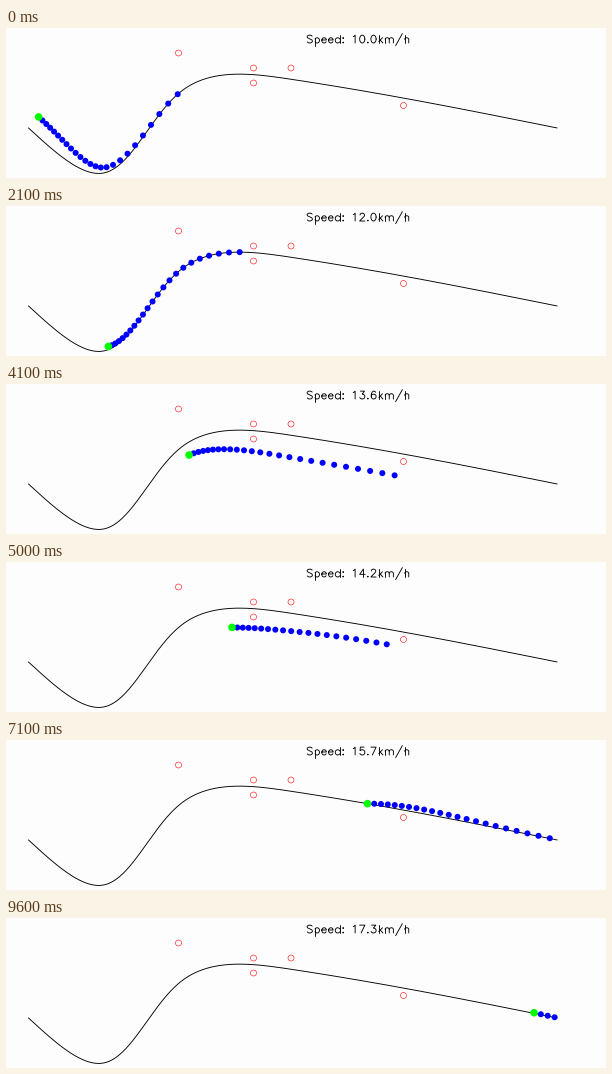
A matplotlib script for the animation above (9700 ms loop, 600 px wide and 150 px high).

```python
import numpy as np
import matplotlib.pyplot as plt
from matplotlib.animation import FuncAnimation
from matplotlib.collections import LineCollection
from matplotlib.patches import Circle

W, H, DPI = 600, 150, 100
FRAMES, INTERVAL = 97, 100
SCALE = 7.5                      # pixels per metre
PX = 72 / DPI                    # points per pixel

# Planner settings (SI units)
DT = 0.2
HORIZONS = np.arange(20, 26) * DT
OFFSETS = np.arange(-7, 3)       # the road is wider on the right
TARGET = 30 / 3.6
END_SPEEDS = (25 / 3.6, TARGET)
MAX_SPEED, MAX_ACCEL, MAX_CURVATURE = 50 / 3.6, 2.0, 1.0
RADIUS = 1.5
K_JERK, K_TIME, K_SPEED, K_OFFSET = 0.1, 0.1, 0.6, 1.0

way_x = np.array([0, 10, 20.5, 35, 70.5])
way_y = np.array([0, -6, 5, 6.5, 0])
obstacles = np.array([(20, 10), (30, 6), (30, 8), (35, 8), (50, 3)])

Poly = np.polynomial.Polynomial


def natural_spline(knots, vals):
    """Return a function giving value and slope of a natural cubic spline."""
    n = len(knots)
    h = np.diff(knots)
    slope = np.diff(vals) / h
    A, B = np.eye(n), np.zeros(n)
    for i in range(1, n - 1):
        A[i, i - 1:i + 2] = h[i - 1], 2 * (h[i - 1] + h[i]), h[i]
        B[i] = 3 * (slope[i] - slope[i - 1])
    c = np.linalg.solve(A, B)
    b = slope - h * (c[1:] + 2 * c[:-1]) / 3
    d = np.diff(c) / (3 * h)

    def at(s):
        i = np.clip(np.searchsorted(knots, s, side="right") - 1, 0, n - 2)
        u = s - knots[i]
        value = vals[i] + u * (b[i] + u * (c[i] + u * d[i]))
        return value, b[i] + u * (2 * c[i] + 3 * u * d[i])

    return at


knots = np.concatenate([[0], np.cumsum(np.hypot(np.diff(way_x), np.diff(way_y)))])
spline_x = natural_spline(knots, way_x)
spline_y = natural_spline(knots, way_y)


def to_world(s, d):
    """Map distance along the course and side offset to x, y."""
    keep = s < knots[-1]
    s, d = s[keep], d[keep]
    x, dx = spline_x(s)
    y, dy = spline_y(s)
    norm = np.hypot(dx, dy)
    return x - d * dy / norm, y + d * dx / norm


def to_pixels(x, y):
    return 22.5 + SCALE * x, 100 - SCALE * y


def side_poly(d, v, a, end, T):
    """Quintic that comes to rest at the offset `end`."""
    gap = end - (d + v * T + a * T**2 / 2)
    dv, da = -(v + a * T) * T, -a * T**2
    return Poly([d, v, a / 2,
                 (10 * gap - 4 * dv + da / 2) / T**3,
                 (-15 * gap + 7 * dv - da) / T**4,
                 (6 * gap - 3 * dv + da / 2) / T**5])


def along_poly(s, v, end, T):
    """Quartic that reaches the speed `end` without acceleration."""
    return Poly([s, v, 0, (end - v) / T**2, -(end - v) / (2 * T**3)])


def is_safe(t, along, x, y):
    if along.deriv()(t).max() >= MAX_SPEED or along.deriv(2)(t).max() >= MAX_ACCEL:
        return False
    dx, dy = np.diff(x), np.diff(y)
    bend = np.diff(np.arctan2(dy, dx)) / np.hypot(dx, dy)[:-1]
    if bend.max(initial=0) >= MAX_CURVATURE:
        return False
    gaps = np.hypot(x[:, None] - obstacles[:, 0], y[:, None] - obstacles[:, 1])
    return gaps.min(initial=np.inf) > RADIUS


def plan(s, v, d, d_v, d_a):
    """Return the cheapest safe pair of polynomials and its points."""
    options = []
    for T in HORIZONS:
        t = DT * np.arange(round(T / DT))
        runs = []
        for end in END_SPEEDS:
            along = along_poly(s, v, end, T)
            jerk = np.sum(along.deriv(3)(t)**2)
            miss = (TARGET - along.deriv()(t[-1]))**2
            runs.append((K_JERK * jerk + K_TIME * T + K_SPEED * miss, along))
        for end in OFFSETS:
            side = side_poly(d, d_v, d_a, end, T)
            jerk = np.sum(side.deriv(3)(t)**2)
            cost = K_JERK * jerk + K_TIME * T + K_OFFSET * side(t[-1])**2
            options += [(cost + run_cost, t, along, side) for run_cost, along in runs]
    options.sort(key=lambda option: option[0])
    best = None
    for _, t, along, side in options:
        x, y = to_world(along(t), side(t))
        best = best or (along, side, x, y)
        if is_safe(t, along, x, y):
            return along, side, x, y
    return best


def drive():
    """Replan at every step; collect path pixels and the speed label."""
    s, v, d, d_v, d_a = 0.0, 10 / 3.6, 2.0, 0.0, 0.0
    steps = []
    for _ in range(FRAMES):
        along, side, x, y = plan(s, v, d, d_v, d_a)
        s, v = along(DT), along.deriv()(DT)
        d, d_v, d_a = side(DT), side.deriv()(DT), side.deriv(2)(DT)
        label = f"Speed: {v * 3.6:.6f}"[:11] + "km/h"
        steps.append((np.column_stack(to_pixels(x, y)), label))
    return steps


# Single-stroke lettering: 21 units tall, baseline at 0
def arc(cx, cy, rx, ry, start, stop):
    a = np.radians(np.linspace(start, stop, 17))
    return list(zip(cx + rx * np.cos(a), cy + ry * np.sin(a)))


def dot(y):
    return [(5, y + 2), (4, y + 1), (5, y), (6, y + 1), (5, y + 2)]


def stem(x, top, bottom=0):
    return [(x, top), (x, bottom)]


def arch(x):
    return arc(x + 5.5, 9.5, 5.5, 4.5, 175, 0) + [(x + 11, 0)]


# Each glyph: advance width, then its strokes
glyphs = {
    "0": (20, arc(10, 10.5, 7, 10.5, 0, 360)),
    "1": (20, [(6, 17), (8, 18), (11, 21), (11, 0)]),
    "2": (20, arc(10, 15.5, 6, 5.5, 175, -35) + [(3, 0), (17, 0)]),
    "3": (20, [(5, 21), (16, 21)] + arc(10, 6.5, 7, 6.5, 90, -157)),
    "4": (20, [(13, 21), (3, 7), (18, 7)], stem(13, 21)),
    "5": (20, [(15, 21), (5, 21), (4, 12)] + arc(10, 7, 7, 7, 130, -155)),
    "6": (20, [(16, 18)] + arc(11, 9, 7, 12, 70, 180)
          + arc(10.5, 6.5, 6.5, 6.5, 180, 540)),
    "7": (20, [(3, 21), (17, 21), (7, 0)]),
    "8": (20, arc(10, 16.7, 6, 4.3, 0, 360), arc(10, 6.2, 7, 6.2, 0, 360)),
    "9": (20, arc(9.5, 14.5, 6.5, 6.5, 0, 360) + arc(9, 12, 7, 12, 0, -140)),
    "S": (20, arc(10, 16.5, 7, 4.5, 25, 245) + arc(10, 5, 7, 5, 65, -155)),
    "p": (19, stem(4, 14, -7), arc(9.5, 7, 6.5, 7, 148, -148)),
    "e": (18, [(3, 8), (15, 8)] + arc(9.3, 7, 6.3, 7, 10, 328)),
    "d": (19, stem(15, 21), arc(9.5, 7, 6.5, 7, 32, 328)),
    "k": (17, stem(4, 21), [(14, 14), (4, 4)], [(8, 8), (15, 0)]),
    "m": (30, stem(4, 14), arch(4), arch(15)),
    "h": (19, stem(4, 21), arch(4)),
    "/": (22, [(20, 25), (2, -7)]),
    ":": (10, dot(12), dot(0)),
    ".": (10, dot(0)),
    " ": (16,),
}


def lettering(text, x, y, size=0.375):
    lines = []
    for ch in text:
        width, *strokes = glyphs[ch]
        lines += [np.array(p) * (size, -size) + (x, y) for p in strokes]
        x += width * size
    return lines


fig = plt.figure(figsize=(W / DPI, H / DPI), dpi=DPI, facecolor="#fefdfe")
ax = fig.add_axes([0, 0, 1, 1])
ax.set_xlim(0, W)
ax.set_ylim(H, 0)
ax.axis("off")

course_s = np.arange(0, knots[-1], 0.1)
ax.plot(*to_pixels(*to_world(course_s, 0 * course_s)),
        color="black", lw=0.9 * PX, zorder=0)

dots = [ax.add_patch(Circle((0, 0), 3, color="#0000ff", lw=0, zorder=1))
        for _ in range(25)]
car = ax.add_patch(Circle((0, 0), 3.8, color="#00ff00", lw=0, zorder=2))
for ox, oy in obstacles:
    ax.add_patch(Circle(to_pixels(ox, oy), 3, fill=False, ec="red",
                        lw=0.55 * PX, zorder=3))
label = LineCollection([], colors="black", linewidths=0.9 * PX,
                       capstyle="round", zorder=4)
ax.add_collection(label, autolim=False)

steps = drive()


def update(i):
    points, text = steps[i]
    for k, patch in enumerate(dots):
        patch.set_visible(k < len(points))
        if k < len(points):
            patch.center = tuple(points[k])
    if len(points):
        car.center = tuple(points[0])
    label.set_segments(lettering(text, 300, 15))
    return [*dots, car, label]


anim = FuncAnimation(fig, update, frames=FRAMES, interval=INTERVAL,
                     repeat=True, repeat_delay=0, blit=False)
plt.show()
```
